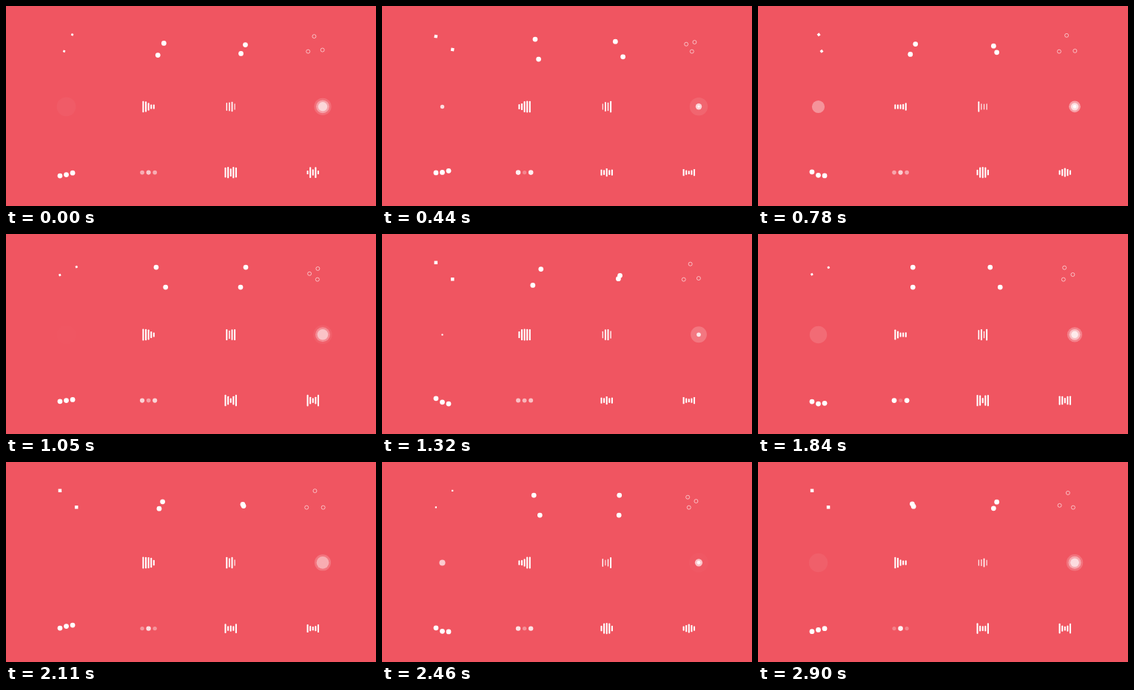
Recreate the animation shown at these times as an HTML page. Size 500 by 271 pixels, loop 2990 ms.

```html
<!DOCTYPE html>
<html lang="en">
<head>
<meta charset="utf-8">
<title>Loaders</title>
<style>
html, body { margin: 0; width: 100%; height: 100%; overflow: hidden; background: #f05561; }
svg { display: block; width: 100%; height: 100%; }
</style>
</head>
<body>
<svg id="stage" viewBox="0 0 500 271" fill="#fff"></svg>
<script>
const LOOP = 2990, STEPS = 34, STEP = 0.09;
const START = 69.86;   // seconds the loaders have already run
const S = 0.45;        // loaders are drawn at 45 %
const stage = document.getElementById('stage');
const parts = [];

function add(tag, attrs, update) {
  const el = document.createElementNS('http://www.w3.org/2000/svg', tag);
  const set = values => {
    for (const k in values) el.setAttribute(k, values[k]);
  };
  set(attrs);
  stage.appendChild(el);
  parts.push(t => set(update(t)));
}

function bezier(x1, y1, x2, y2) {
  const at = (a, b, u) => 3 * a * u * (1 - u) ** 2 + 3 * b * u * u * (1 - u) + u ** 3;
  return x => {
    let lo = 0, hi = 1;
    for (let i = 0; i < 24; i++) {
      const mid = (lo + hi) / 2;
      if (at(x1, x2, mid) < x) lo = mid; else hi = mid;
    }
    return at(y1, y2, lo);
  };
}
const linear = x => x;
const ease = bezier(0.25, 0.1, 0.25, 1);
const easeInOut = bezier(0.42, 0, 0.58, 1);

const phase = (t, dur, delay = 0) => (((t - delay) / dur) % 1 + 1) % 1;
const mix = (a, b, f) => a + (b - a) * f;

// Round trip through evenly timed points, each leg eased
function walk(points, p, curve = linear) {
  const n = points.length, leg = Math.floor(p * n);
  const f = curve(p * n - leg);
  const from = points[leg], to = points[(leg + 1) % n];
  return from.map((v, k) => mix(v, to[k], f));
}

const place = (x, y, rest = '') => `translate(${x.toFixed(3)} ${y.toFixed(3)}) ${rest}`;
const ball = (r, update, attrs = {}) => add('circle', { r, ...attrs }, update);
const col = i => 81.5 + 111.1 * i;
const ROW1 = 58.5, ROW2 = 136.5, ROW3 = 225.6;

// Cubes walking round a square, half size at every other corner
const square = [[0, 0, 1], [50, 0, 0.5], [50, 50, 1], [0, 50, 0.5]];
for (const delay of [0, -0.8])
  add('rect', { x: -2.25, y: -2.25, width: 4.5, height: 4.5 }, t => {
    const p = phase(t, 1.6, delay);
    const [x, y, k] = walk(square, p, easeInOut);
    const turn = -90 * easeInOut(p * 4 % 1);
    return { transform: place(72.8 + x * S, 38.8 + y * S, `rotate(${turn}) scale(${k})`) };
  });

// Zig-zag pairs, mirrored through the centre
const mid = [0, 0], left = [-15, -30], right = [15, -30];
function zigzag(cx, dur, path) {
  for (const side of [S, -S])
    ball(7.5 * S, t => {
      const [x, y] = walk(path, phase(t, dur));
      return { transform: place(cx + side * x, ROW1 + side * y) };
    });
}
zigzag(209.3, 0.7, [mid, left, right]);
zigzag(320.5, 1.5, [mid, left, right, mid, right, left]);

// Rings following each other round a triangle
const triangle = [[0, 50], [25, 0], [50, 50]];
for (let i = 0; i < 3; i++)
  ball(2.5, t => {
    const [x, y] = walk(triangle, phase(t, 2, i * 2 / 3), easeInOut);
    return { transform: place(406.2 + x * S, 39.1 + y * S) };
  }, { fill: 'none', stroke: '#fff', 'stroke-width': 0.6 });

// Growing discs
ball(0, t => {
  const f = easeInOut(phase(t, 1));
  return { r: 30 * S * f, opacity: 1 - f };
}, { cx: col(0), cy: ROW2 });
for (const delay of [0, 0.2, 0.4])
  ball(0, t => {
    const p = phase(t, 1, delay);
    return { r: 30 * S * p, opacity: Math.min(p / 0.05, (1 - p) / 0.95) };
  }, { cx: 428, cy: ROW2 - 0.2 });

// Bars: scale(i, t) returns [x scale, y scale]
function bars(cx, cy, count, scale) {
  for (let i = 0; i < count; i++)
    add('rect', { x: -2.3, y: -17.5, width: 4.6, height: 35, rx: 2 }, t => {
      const [sx, sy] = scale(i, t);
      const x = cx + (i - (count - 1) / 2) * 8 * S;
      return { transform: place(x, cy, `scale(${sx * S} ${sy * S})`) };
    });
}
const dip = (low, p, curve) => walk([[1], [low]], p, curve)[0];
const fromMiddle = i => Math.abs(i - 2);

const snap = bezier(0.2, 0.68, 0.18, 1.08);
bars(col(1), ROW2, 5, (i, t) => [1, dip(0.4, phase(t, 1, 0.1 * (i + 1)), snap)]);

// Each party bar keeps its own [duration, delay]
const party = [[1.26, 0.77], [0.43, 0.29], [1.01, 0.28], [0.73, 0.74]];
bars(col(2), ROW2, 4, (i, t) => {
  const k = dip(0.5, phase(t - START + 1, ...party[i]), ease);
  return [k, k];
});

const pulse = bezier(0.85, 0.25, 0.37, 0.85);
bars(col(2), ROW3, 5, (i, t) =>
  [1, dip(0.4, phase(t, 0.9, 0.2 * fromMiddle(i) - 0.6), pulse)]);

// Slow fall, quick rise, short rest
const rapid = bezier(0.11, 0.49, 0.38, 0.78);
bars(col(3), ROW3, 5, (i, t) => {
  const p = phase(t, 0.9, 0.25 * fromMiddle(i) - 0.605);
  const down = p < 0.8 ? rapid(p / 0.8) : 1 - rapid(Math.min(1, (p - 0.8) / 0.1));
  return [1, 1 - 0.7 * down];
});

// Rows of three balls: a wave and a beat
const wave = [[0], [10], [-10]];
for (let i = 0; i < 3; i++) {
  const shift = (i - 1) * 19 * S;
  ball(7.5 * S, t => {
    const [y] = walk(wave, phase(t, 0.6, 0.07 * (i + 1)), easeInOut);
    return { transform: place(col(0) + shift, ROW3 + y * S) };
  });
  ball(7.5 * S, t => {
    const f = Math.abs(2 * phase(t, 0.7, i % 2 ? 0 : 0.35) - 1);
    return {
      opacity: mix(0.2, 1, f),
      transform: place(col(1) + shift, ROW3, `scale(${mix(0.75, 1, f)})`)
    };
  });
}

function render(ms) {
  const n = Math.floor((ms % LOOP + 7) * STEPS / LOOP) % STEPS;
  parts.forEach(update => update(START + n * STEP));
}

let begin;
function loop(now) {
  begin ??= now;
  render(now - begin);
  requestAnimationFrame(loop);
}
render(0);
requestAnimationFrame(loop);
</script>
</body>
</html>
```
